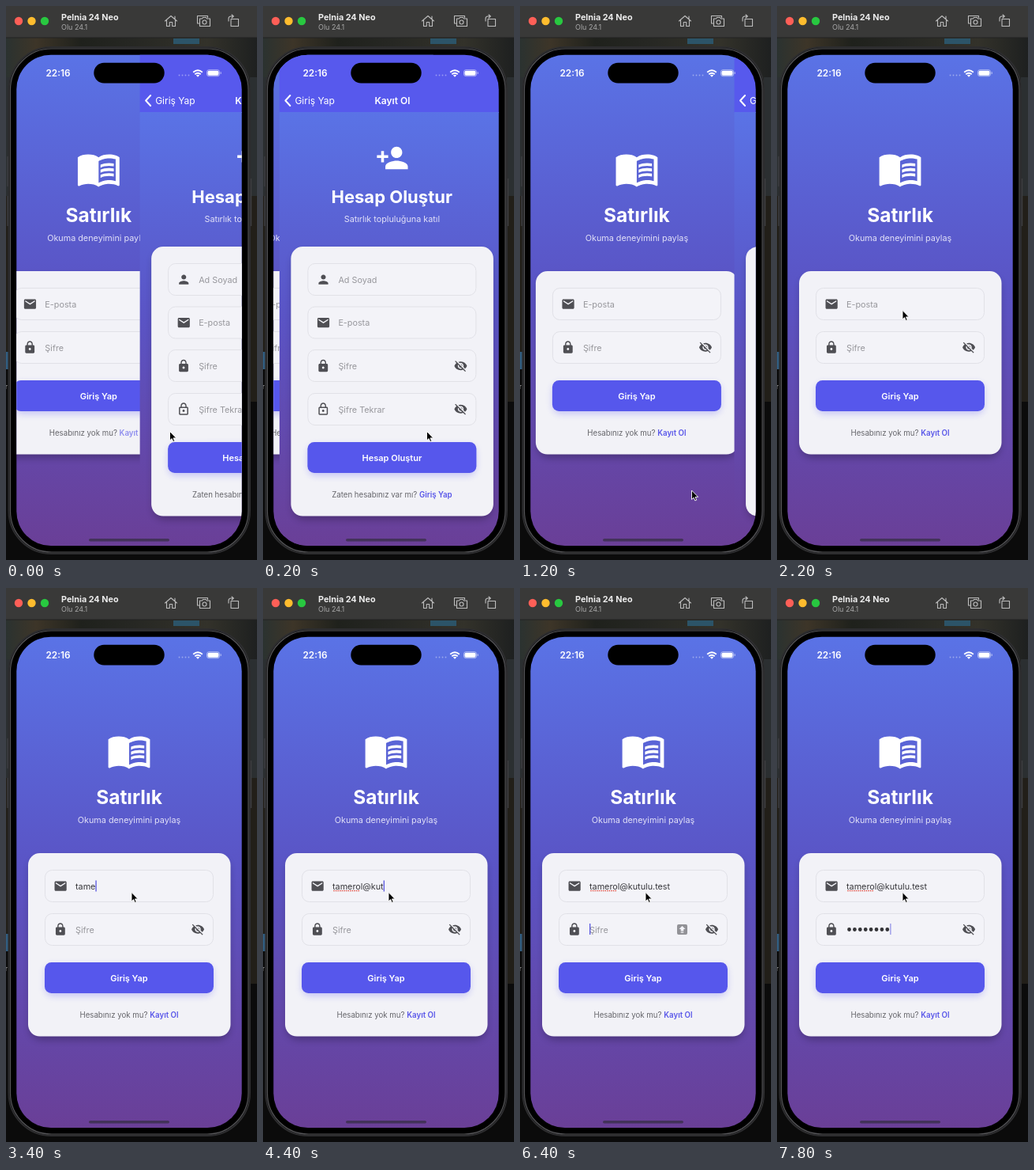
Animation, 318 px wide and 700 px high, one loop 8 s. Source, as an HTML page:

```html
<!DOCTYPE html>
<html lang="tr">
<head>
<meta charset="utf-8">
<title>Giriş</title>
<style>
html, body { margin: 0; width: 100%; height: 100%; overflow: hidden; background: #000; }
svg { display: block; width: 100%; height: 100%; }
text { font-family: Inter, Roboto, sans-serif; white-space: pre; }
.mid { text-anchor: middle; }
.title { font-weight: 700; font-size: 22px; fill: #fff; }
.sub { font-size: 10.8px; fill: #e2e1f8; }
.hint { font-size: 10.8px; fill: #97979c; }
.typed { font-size: 10.8px; fill: #37373b; }
.cta { font-weight: 600; font-size: 11px; fill: #fff; }
.foot { font-size: 9.7px; fill: #66666b; }
.link { font-weight: 600; fill: #5856e9; }
.icon { fill: #4f4f54; }
.tool { fill: none; stroke: #bdbdbd; stroke-width: 1.1; stroke-linejoin: round; stroke-linecap: round; }
</style>
</head>
<body>
<svg viewBox="0 0 318 700" preserveAspectRatio="none">
<defs>
  <linearGradient id="sky" x1="0" y1="0" x2="0" y2="1">
    <stop offset="0" stop-color="#5a73e6"/>
    <stop offset=".47" stop-color="#5a54c5"/>
    <stop offset="1" stop-color="#6a3f97"/>
  </linearGradient>
  <linearGradient id="forest">
    <stop offset="0" stop-color="#2b3230"/>
    <stop offset=".12" stop-color="#3d3528"/>
    <stop offset=".3" stop-color="#1f211c"/>
    <stop offset=".5" stop-color="#262723"/>
    <stop offset=".8" stop-color="#33322a"/>
    <stop offset="1" stop-color="#1e2020"/>
  </linearGradient>
  <filter id="soft" x="-20%" y="-40%" width="140%" height="190%"><feGaussianBlur stdDeviation="5"/></filter>
  <clipPath id="screen"><rect x="13.300" y="61.700" width="285.400" height="620.300" rx="43.500"/></clipPath>

  <path id="mail" d="M20 4H4c-1.1 0-1.99.9-1.99 2L2 18c0 1.1.9 2 2 2h16c1.1 0 2-.9 2-2V6c0-1.1-.9-2-2-2zm0 4l-8 5-8-5V6l8 5 8-5v2z"/>
  <path id="lock" d="M18 8h-1V6c0-2.76-2.24-5-5-5S7 3.24 7 6v2H6c-1.1 0-2 .9-2 2v10c0 1.1.9 2 2 2h12c1.1 0 2-.9 2-2V10c0-1.1-.9-2-2-2zm-6 9c-1.1 0-2-.9-2-2s.9-2 2-2 2 .9 2 2-.9 2-2 2zm3.1-9H8.9V6c0-1.71 1.39-3.1 3.1-3.1 1.71 0 3.1 1.39 3.1 3.1v2z"/>
  <path id="lock2" d="M12 17c1.1 0 2-.9 2-2s-.9-2-2-2-2 .9-2 2 .9 2 2 2zm6-9h-1V6c0-2.76-2.24-5-5-5S7 3.24 7 6v2H6c-1.1 0-2 .9-2 2v10c0 1.1.9 2 2 2h12c1.1 0 2-.9 2-2V10c0-1.1-.9-2-2-2zM8.9 6c0-1.71 1.39-3.1 3.1-3.1s3.1 1.39 3.1 3.1v2H8.9V6zM18 20H6V10h12v10z"/>
  <path id="person" d="M12 12c2.21 0 4-1.79 4-4s-1.79-4-4-4-4 1.79-4 4 1.79 4 4 4zm0 2c-2.67 0-8 1.34-8 4v2h16v-2c0-2.66-5.33-4-8-4z"/>
  <path id="eye" d="M12 7c2.76 0 5 2.24 5 5 0 .65-.13 1.26-.36 1.83l2.92 2.92c1.51-1.26 2.7-2.89 3.43-4.75-1.73-4.39-6-7.5-11-7.5-1.4 0-2.74.25-3.98.7l2.16 2.16C10.74 7.13 11.35 7 12 7zM2 4.27l2.28 2.28.46.46C3.08 8.3 1.78 10.02 1 12c1.73 4.39 6 7.5 11 7.5 1.55 0 3.03-.3 4.38-.84l.42.42L19.73 22 21 20.73 3.27 3 2 4.27zM7.53 9.8l1.55 1.55c-.05.21-.08.43-.08.65 0 1.66 1.34 3 3 3 .22 0 .44-.03.65-.08l1.55 1.55c-.67.33-1.41.53-2.2.53-2.76 0-5-2.24-5-5 0-.79.2-1.53.53-2.2zm4.31-.78l3.15 3.15.02-.16c0-1.66-1.34-3-3-3l-.17.01z"/>
  <rect id="box" x="49.500" y=".5" width="213" height="40" rx="9" fill="#f3f3f8" stroke="#e1e1e7"/>
  <g id="button">
    <rect x="50" y="4" width="212" height="38" rx="9" fill="#5856f0" opacity=".32" filter="url(#soft)"/>
    <rect x="49" width="214" height="39" rx="8.500" fill="#5657ec"/>
  </g>
</defs>

<!-- desktop -->
<rect width="318" height="700" fill="#0b0b0b"/>
<rect y="40" width="318" height="60" fill="url(#forest)"/>
<rect x="212" y="41" width="33" height="7" fill="#2c5468"/>
<path d="M0 90h5v150H0zM309 90h9v150h-9z" fill="#2b2f31"/>
<path d="M0 240h5v200H0zM309 240h9v260h-9z" fill="#221f19"/>
<rect y="437" width="3" height="22" fill="#315d80"/>
<text x="-1" y="484" font-size="8" fill="#aaa">r</text>

<!-- window bar -->
<rect width="318" height="40" fill="#393938"/>
<rect y="39.500" width="318" height="1" fill="#222"/>
<circle cx="16" cy="19" r="5.200" fill="#fe5f57"/>
<circle cx="32.500" cy="19" r="5.200" fill="#febc2e"/>
<circle cx="49" cy="19" r="5.200" fill="#28c840"/>
<text x="70" y="17.500" font-size="10.800" font-weight="700" fill="#ececec">Pelnia 24 Neo</text>
<text x="70" y="29.500" font-size="9" fill="#a9a9a9">Olu 24.1</text>
<g class="tool">
  <path d="M201.500 19l7.500-6.500 7.500 6.500M203.500 17.500v8h3.800v-5h3.400v5h3.800v-8M214 16.500v-3.500"/>
  <path d="M244.500 22h-2v-9.500h13v2"/>
  <path d="M245.500 16h3l1-1.500h4l1 1.500h4v9.500h-13z"/>
  <circle cx="251.500" cy="20.500" r="2.500"/>
  <path d="M285 16.500h9.500v9h-9.500zM282 19v-3q0-3 3-3h3M286 11l2.300 2-2.300 2"/>
</g>

<!-- handset -->
<rect x="3.500" y="52" width="305.500" height="640" rx="54" fill="#0a0a0b" stroke="#2d2d2f" stroke-width="2"/>
<rect x="5.500" y="54" width="301.500" height="636" rx="52" fill="#000" stroke="#565659" stroke-width="1.200"/>
<path d="M2 190v38M2 240v38M310.500 218v60" stroke="#3d3d40" stroke-width="1.500"/>

<g clip-path="url(#screen)">
  <g id="login">
    <rect x="13" y="61" width="286" height="621" fill="url(#sky)"/>
    <g transform="translate(127.200 176.800) scale(2.400)" fill="#fff">
      <path d="M21 5c-1.110-.35-2.330-.5-3.500-.5-1.950 0-4.050.4-5.500 1.500-1.450-1.100-3.550-1.500-5.500-1.500S2.450 4.900 1 6v14.650c0 .25.25.5.5.5.1 0 .15-.05.25-.05C3.100 20.450 5.050 20 6.500 20c1.950 0 4.050.4 5.500 1.500 1.350-.85 3.800-1.500 5.500-1.500 1.650 0 3.350.3 4.750 1.050.1.05.15.05.25.05.25 0 .5-.25.5-.5V6c-.6-.45-1.250-.75-2-1zm0 13.500c-1.100-.35-2.300-.5-3.500-.5-1.700 0-4.150.65-5.500 1.500V8c1.350-.85 3.800-1.500 5.500-1.500 1.200 0 2.400.15 3.500.5v11.500z"/>
      <path id="line" d="M17.500 10.500c.88 0 1.730.09 2.500.26V9.240c-.79-.15-1.640-.24-2.500-.24-1.700 0-3.240.29-4.500.83v1.660c1.130-.64 2.700-.99 4.500-.99z"/>
      <use href="#line" y="2.660"/>
      <use href="#line" y="5.330"/>
    </g>
    <text class="title mid" x="156" y="273" style="font-size:24.500px">Satırlık</text>
    <text class="sub mid" x="156" y="297">Okuma deneyimini paylaş</text>
    <rect x="30" y="341" width="253" height="230" rx="15" opacity=".25" filter="url(#soft)"/>
    <rect x="28" y="335" width="256.500" height="231.600" rx="15" fill="#f2f2f7"/>
    <use href="#box" y="356"/>
    <use href="#box" y="411"/>
    <g class="icon">
      <use href="#mail" transform="translate(60 367.500) scale(.76)"/>
      <use href="#lock" transform="translate(60 422.500) scale(.74)"/>
      <use href="#eye" transform="translate(234.300 422.500) scale(.73)"/>
    </g>
    <text id="mailHint" class="hint" x="88" y="381">E-posta</text>
    <text id="passHint" class="hint" x="88" y="435.500">Şifre</text>
    <text id="mailText" class="typed" x="88" y="381"></text>
    <path id="spell" d="M90 382.500h33" stroke="#dd4b3e" stroke-width="1.700" stroke-dasharray="0 2.600" stroke-linecap="round"/>
    <path id="dots" fill="none" stroke="#333337" stroke-width="4.800" stroke-dasharray="0 6.900" stroke-linecap="round"/>
    <g id="caps">
      <rect x="199" y="425" width="13" height="13" rx="2" fill="#929297"/>
      <path d="M205.500 427l4 4h-2.200v2.500h-3.600v-2.500h-2.200zM203.700 434.500h3.600v1.300h-3.600z" fill="#f3f3f8"/>
    </g>
    <rect id="caret" width="1.300" height="14" fill="#5856e0"/>
    <use href="#button" y="473"/>
    <text class="cta mid" x="156" y="496.500">Giriş Yap</text>
    <text class="foot mid" x="156" y="542.500">Hesabınız yok mu? <tspan id="toRegister" class="link">Kayıt Ol</tspan></text>
  </g>

  <g id="register">
    <rect x="13.500" y="61" width="286" height="74" fill="#5759ed"/>
    <rect x="13.500" y="134" width="286" height="548" fill="url(#sky)"/>
    <path d="M27 113l-6 6.500 6 6.500" fill="none" stroke="#fff" stroke-width="2" stroke-linecap="round" stroke-linejoin="round"/>
    <text x="33" y="124" font-size="12" fill="#fff">Giriş Yap</text>
    <text class="mid" x="156.500" y="124" font-size="12" font-weight="600" fill="#fff">Kayıt Ol</text>
    <path transform="translate(135.200 170.700) scale(1.780)" fill="#fff" d="M15 12c2.210 0 4-1.790 4-4s-1.790-4-4-4-4 1.790-4 4 1.790 4 4 4zm-9-2V7H4v3H1v2h3v3h2v-3h3v-2H6zm9 4c-2.670 0-8 1.340-8 4v2h16v-2c0-2.660-5.330-4-8-4z"/>
    <text class="title mid" x="155.800" y="249">Hesap Oluştur</text>
    <text class="sub mid" x="156" y="272.500">Satırlık topluluğuna katıl</text>
    <rect x="30" y="310" width="253" height="339" rx="15" opacity=".25" filter="url(#soft)"/>
    <rect x="28" y="304" width="256.500" height="340.600" rx="15" fill="#f2f2f7"/>
    <use href="#box" y="325"/>
    <use href="#box" y="379.500"/>
    <use href="#box" y="434"/>
    <use href="#box" y="489"/>
    <g class="icon">
      <use href="#person" transform="translate(60 336.500) scale(.76)"/>
      <use href="#mail" transform="translate(60 391) scale(.76)"/>
      <use href="#lock" transform="translate(60 446) scale(.74)"/>
      <use href="#lock2" transform="translate(60 500.500) scale(.74)"/>
      <use href="#eye" transform="translate(234.300 446) scale(.73)"/>
      <use href="#eye" transform="translate(234.300 500.500) scale(.73)"/>
    </g>
    <g class="hint">
      <text x="88" y="349.500">Ad Soyad</text>
      <text x="88" y="404">E-posta</text>
      <text x="88" y="459">Şifre</text>
      <text x="88" y="513.500">Şifre Tekrar</text>
    </g>
    <use href="#button" y="551"/>
    <text class="cta mid" x="156" y="574.500">Hesap Oluştur</text>
    <text class="foot mid" x="156" y="621">Zaten hesabınız var mı? <tspan id="toLogin" class="link">Giriş Yap</tspan></text>
  </g>

  <!-- status bar -->
  <rect x="111.300" y="71.700" width="89.400" height="25.800" rx="12.900"/>
  <text x="50.500" y="89" font-size="11.800" font-weight="600" fill="#fff">22:16</text>
  <path d="M219.500 87.500h13" stroke="#fff" stroke-width="1.800" stroke-dasharray="0 4" stroke-linecap="round" opacity=".4"/>
  <path d="M237.200 83.800q5.800-5 11.600 0M239.300 86.300q3.700-3.100 7.400 0" fill="none" stroke="#fff" stroke-width="1.900"/>
  <path d="M240.800 87.500q2.200-1.600 4.400 0l-2.200 2.300z" fill="#fff"/>
  <rect x="254.500" y="80.700" width="16" height="8" rx="2.600" fill="none" stroke="#fff" stroke-opacity=".5"/>
  <rect x="255.500" y="81.700" width="14" height="6" rx="1.700" fill="#fff"/>
  <path d="M272.200 83.300v2.800" stroke="#fff" stroke-opacity=".5" stroke-width="1.200"/>
  <rect x="105" y="673" width="102" height="3.500" rx="1.750" fill="#43325a"/>
</g>

<path id="cursor" d="M0 0V11.500L2.600 9.100 4.300 13 6.200 12.200 4.500 8.400H8.200Z" fill="#000" stroke="#fff" stroke-width=".9" stroke-linejoin="round"/>
</svg>

<script>
const LOOP = 8000, STEP = 200, WIDTH = 285;
const EMAIL = 'tamerol@kutulu.test', PASS_LENGTH = 8;
const el = {};
document.querySelectorAll('[id]').forEach(node => el[node.id] = node);

const clamp = (v, lo, hi) => Math.min(hi, Math.max(lo, v));
const show = (node, on) => node.style.display = on ? '' : 'none';
const move = (node, x, y = 0) => node.setAttribute('transform', `translate(${x} ${y})`);

// Critically damped spring: share of the way still to go.
function springLeft(ms) {
  const k = Math.max(0, ms) * 0.02;
  return (1 + k) * Math.exp(-k);
}

const typedCount = (t, start, max) => clamp(Math.floor((t - start) / 150), 0, max);

// time, x, y
const pointer = [
  [200, 207.5, 537.5], [800, 217.5, 616], [1000, 217.5, 616],
  [1200, 217.5, 612], [2000, 159, 384.5]
];

function pointerAt(t) {
  const next = pointer.findIndex(p => p[0] > t);
  if (next === 0) return pointer[0].slice(1);
  if (next < 0) return pointer[pointer.length - 1].slice(1);
  const a = pointer[next - 1], b = pointer[next];
  const u = (t - a[0]) / (b[0] - a[0]), e = u * u * (3 - 2 * u);
  return [1, 2].map(i => a[i] + (b[i] - a[i]) * e);
}

function render(t) {
  const pushed = t <= 1000 ? 1 - springLeft(t + 76.5) : springLeft(t - 1002);
  move(el.login, -0.3 * WIDTH * pushed);
  move(el.register, WIDTH * (1 - pushed));
  show(el.register, pushed > 0.001);
  el.toRegister.style.fillOpacity = t < 200 ? 0.65 : 1;
  el.toLogin.style.fillOpacity = t === 1000 ? 0.2 : 1;
  move(el.cursor, ...pointerAt(t));

  const letters = typedCount(t, 2700, EMAIL.length);
  el.mailText.textContent = EMAIL.slice(0, letters);
  show(el.mailHint, !letters);
  show(el.spell, letters > 7);

  const bullets = typedCount(t, 6500, PASS_LENGTH);
  show(el.passHint, !bullets);
  show(el.dots, bullets);
  el.dots.setAttribute('d', `M91.500 431.500h${Math.max(0, bullets - 1) * 6.9 + 0.1}`);

  const inPass = t >= 6200;
  show(el.caps, inPass && t < 6800);
  show(el.caret, t >= 2400);
  const textWidth = inPass ? bullets * 6.9 : letters ? el.mailText.getComputedTextLength() : 0;
  el.caret.setAttribute('x', 88 + textWidth);
  el.caret.setAttribute('y', inPass ? 424 : 369.5);
  el.caret.style.opacity = t % 1000 < 700 ? 1 : 0.6;
}

const origin = performance.now();
function tick() {
  const t = (performance.now() - origin) % LOOP;
  render(Math.floor(t / STEP) * STEP);
  requestAnimationFrame(tick);
}
tick();
</script>
</body>
</html>
```
